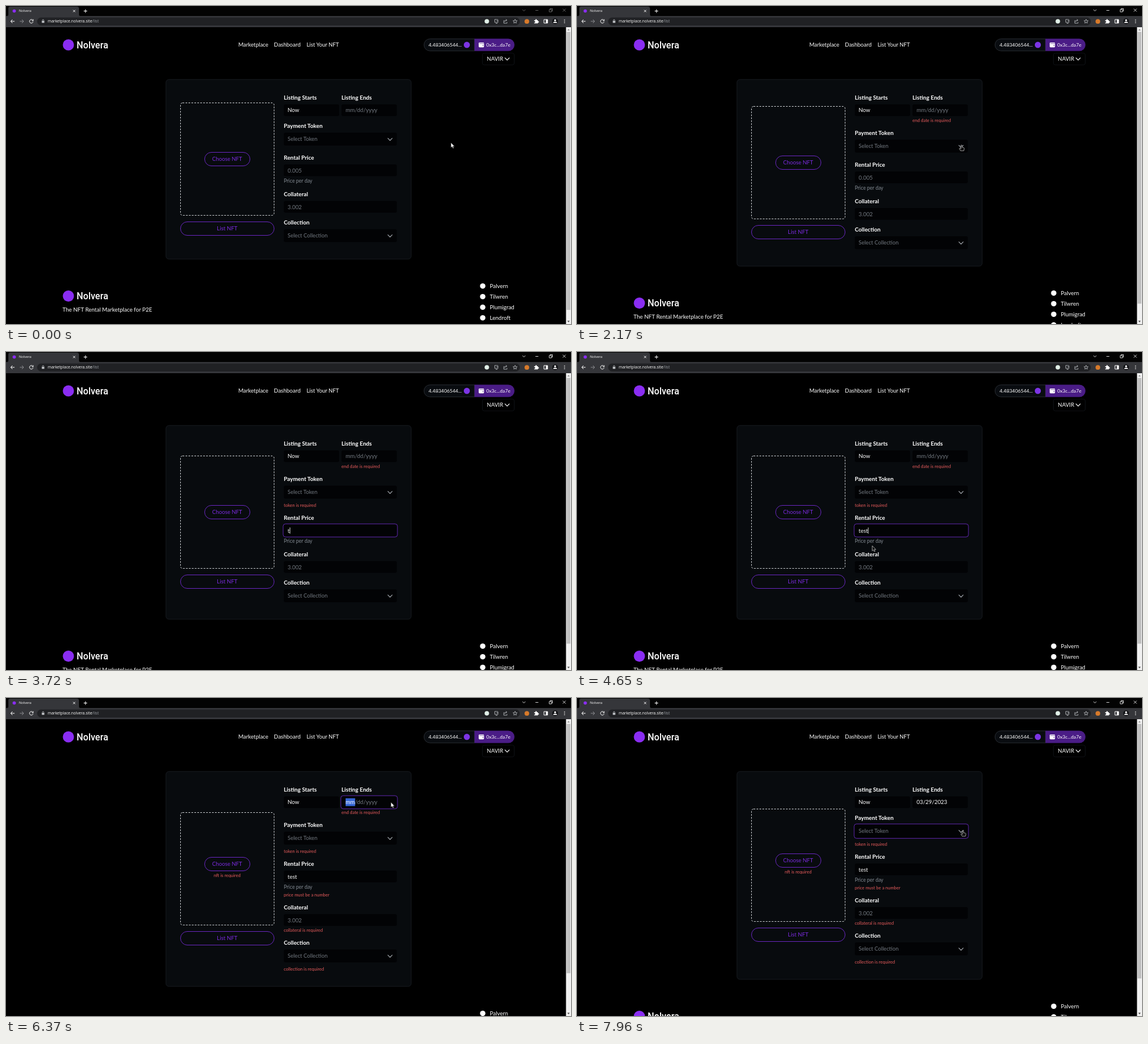
These frames come from a looping animation (960 px wide and 540 px high, 7990 ms). An HTML page:

```html
<!DOCTYPE html>
<html lang="en">
<head>
<meta charset="utf-8">
<title>List an NFT</title>
<style>
html, body { margin: 0; width: 100%; height: 100%; overflow: hidden; background: #000; }
svg { display: block; width: 100%; height: 100%; }
text { font-family: Lato, "Open Sans", sans-serif; fill: #fff; white-space: pre; }
.ui { font-family: "Open Sans", sans-serif; }
.cal { font-family: "Liberation Sans", Arial, sans-serif; }
.brand { font-family: Roboto, sans-serif; font-weight: 500; }
.bold { font-weight: 700; }
.mid { text-anchor: middle; }
.ph { fill: #737980; }
.help { fill: #858c94; }
.err { fill: #e85c5c; }
.vio { fill: #7c2be0; }
.line { fill: none; stroke: #fff; stroke-width: 1; }
.thin { fill: none; stroke: #c4c7cb; stroke-width: .8; }
.chev { fill: none; stroke: #a4a9b0; stroke-width: 1.2; stroke-linecap: round; stroke-linejoin: round; }
.field { fill: #020305; }
.ring { fill: #020305; stroke: #5f27ac; stroke-width: 1; }
.pill { fill: none; stroke: #6826bd; stroke-width: 1; }
</style>
</head>
<body>
<svg id="stage" viewBox="0 0 960 540"></svg>
<script>
const LOOP = 7990;
const PURPLE = '#8a2df2';
const stage = document.getElementById('stage');

const text = (x, y, s, size, cls = '', extra = '') =>
  `<text x="${x}" y="${y + size * 0.36}" font-size="${size}" class="${cls}" ${extra}>${s}</text>`;
const rect = (x, y, w, h, r, attrs) =>
  `<rect x="${x}" y="${y}" width="${w}" height="${h}" rx="${r}" ${attrs}/>`;
const dot = (x, y, r, fill) => `<circle cx="${x}" cy="${y}" r="${r}" fill="${fill}"/>`;
const path = (d, attrs = 'class="line"') => `<path d="${d}" ${attrs}/>`;
const group = (id, body) => `<g id="${id}">${body}</g>`;
const field = (x, y, w, h = 20) => rect(x, y, w, h, 3, 'class="field"');
const ring = (id, x, y, w, h) => rect(x, y, w, h, 4, `id="${id}" class="ring"`);
const label = (x, y, s) => text(x, y, s, 9.7, 'bold');
const error = (id, x, y, s, cls = '') => text(x, y, s, 7.5, 'err ' + cls, `id="${id}"`);
const down = (x, y) => `M${x - 3.6} ${y - 1.8}l3.6 3.6 3.6-3.6`;
const brand = y => dot(106, y, 9.5, PURPLE) + text(120, y + 0.3, 'Nolvera', 15.6, 'brand');

function calendar() {
  let s = rect(570, 187, 109, 140.5, 0, 'fill="#fff" stroke="#8d8d8d" stroke-width=".5"');
  s += text(575.5, 198.2, 'March 2023', 6, 'cal bold', 'style="fill:#111"');
  s += path('M610 197.2h4l-2 2.4z', 'fill="#111"');
  s += path('M650 202.5v-7.5m-3.6 3.4l3.6-3.6 3.6 3.6', 'fill="none" stroke="#c4c4c4" stroke-width=".8"');
  s += path('M666.5 194.5v8m-3.6-3.6l3.6 3.6 3.6-3.6', 'fill="none" stroke="#222" stroke-width=".9"');
  'Su Mo Tu We Th Fr Sa'.split(' ').forEach((d, i) => {
    s += text(582.7 + 14 * i, 217, d, 6.4, 'cal mid', 'style="fill:#222"');
  });
  s += rect(589.7, 252.4, 13.4, 13.4, 0, 'fill="none" stroke="#a0a0a0" stroke-width=".8"');
  s += rect(604, 252.6, 13, 13, 1, 'fill="#4056e8" stroke="#15162a" stroke-width="1.2"');
  s += rect(618, 280.5, 13, 13, 1, 'id="pick" fill="#dfe3ec"');
  for (let i = 0; i < 42; i++) {
    const n = i - 2;
    const day = n < 1 ? n + 28 : n > 31 ? n - 31 : n;
    const fill = n === 14 ? '#fff' : n < 14 ? '#bcbcbc' : n > 31 ? '#7c7c7c' : '#1a1a1a';
    s += text(582.7 + 14 * (i % 7), 231 + 14 * Math.floor(i / 7), day, 6.3,
      'cal mid' + (n === 14 ? ' bold' : ''), `style="fill:${fill}"`);
  }
  s += text(581, 317, 'Clear', 6.2, 'cal', 'style="fill:#2468d8"');
  s += text(652, 317, 'Today', 6.2, 'cal', 'style="fill:#bcbcbc"');
  return s;
}

function chrome() {
  return rect(0, 0, 960, 36, 0, 'fill="#030303"')
    + path('M2 17q2 0 2-3V4q0-3 3-3h113q4 0 4 3v10q0 3 2 3z', 'fill="#35363a"')
    + rect(0, 17, 960, 19, 0, 'fill="#35363a"')
    + rect(53, 19.5, 820, 13.4, 6.7, 'fill="#202124"')
    + dot(14, 8.5, 2.8, PURPLE)
    + text(22, 8.4, 'Nolvera', 5.8, 'ui')
    + path('M114 6.7l3.6 3.6m0-3.6l-3.6 3.6M135 5.6v6m-3-3h6')
    + group('controls', path('M877.5 6l2.5 2.5 2.5-2.5M899.5 7.5h5M923 6h4v4h-4zM924.5 5.8v-1.3h4v4h-1.3M946 4.6l5 5m0-5l-5 5', 'class="line" style="stroke-width:.8"'))
    + path('M14.5 26H8m3-3l-3 3 3 3')
    + path('M23.5 26H30m-3-3l3 3-3 3', 'class="line" style="stroke:#8b8c90"')
    + path('M45.6 24.2a3.1 3.1 0 1 0 .5 2.4M46.2 22.6v2.4h-2.4')
    + rect(60.8, 25.2, 4.4, 3.4, 0.5, 'fill="#c4c7cb"')
    + path('M61.7 25.4v-1a1.3 1.3 0 0 1 2.6 0v1', 'class="thin"')
    + text(71, 26, 'marketplace.nolvera.site<tspan fill="#9aa0a6">/list</tspan>', 6.6, 'ui')
    + dot(817, 26, 3.8, '#e1f0e8')
    + path('M834 22.8h-3.6v5h5.6v-2M832 29.5h3M835.2 22v3.6m-1.6-1.4l1.6 1.6 1.6-1.6M847 24.8h-1.2v4.4h5.4v-2M847.2 26.8q.3-2.8 3.6-2.8m-1.4-1.6l1.7 1.6-1.7 1.6', 'class="thin"')
    + path('M865 22.6l1 2.3 2.5.2-1.9 1.6.6 2.4-2.2-1.3-2.2 1.3.6-2.4-1.9-1.6 2.5-.2z', 'class="thin"')
    + dot(885, 26.2, 3.9, '#d87a2a')
    + path('M897.6 24h2a1.2 1.2 0 1 1 2.2 0h2v2a1.2 1.2 0 1 1 0 2.1v1.4h-6.2v-1.6a1.1 1.1 0 1 0 0-2z', 'fill="#fff"')
    + path('M914 23h6.2v6h-6.2z') + rect(917.4, 23, 2.8, 6, 0, 'fill="#fff"')
    + dot(933, 26, 4.8, '#101114') + dot(933, 24.2, 1.6, '#fff')
    + path('M929.8 28.8q0-2.2 3.2-2.2t3.2 2.2z', 'fill="#fff"')
    + [23.6, 26, 28.4].map(y => dot(949, y, 0.75, '#fff')).join('');
}

function header() {
  return brand(66)
    + text(394.8, 66, 'Marketplace', 9.4)
    + text(455.3, 66, 'Dashboard', 9.5)
    + text(510.8, 66, 'List Your NFT', 9.3)
    + path('M796 55.8h-75.6a10.2 10.2 0 0 0 0 20.4H796z', 'fill="#090c10" stroke="#30353c" stroke-width=".8"')
    + path('M796 55.5h57.5a10.5 10.5 0 0 1 0 21H796z', 'fill="#4a1c86"')
    + text(718, 66.2, '4.483406544...', 8.35)
    + dot(783, 66, 5.2, '#7c34e4')
    + rect(803.2, 62, 9, 8.2, 1.4, 'fill="#fff"')
    + path('M804.4 63.8h7.8', 'stroke="#4a1c86" stroke-width=".7"') + dot(810.4, 67, 0.8, '#4a1c86')
    + text(816, 66.2, '0x3c...da7e', 8.2)
    + rect(809.5, 80, 54, 20, 3, 'fill="#000" stroke="#0e1115"')
    + text(817, 89.8, 'NAVIR', 9.4)
    + path(down(851.5, 90), 'class="chev" style="stroke:#fff"');
}

function form() {
  return rect(271.8, 124.8, 416.6, 305, 5, 'id="panel" fill="#080b0e" stroke="#171b20"')
    + group('left',
        rect(296.5, 164.5, 159, 191, 3.5, 'fill="none" stroke="#c6c9cc" stroke-dasharray="3 2"')
      + group('choose', rect(337.5, 248.5, 77, 23, 11.5, 'class="pill"')
        + text(375.8, 260, 'Choose NFT', 9.3, 'vio mid'))
      + error('nftErr', 375.8, 271, 'nft is required', 'mid')
      + rect(296.5, 366.5, 159, 23, 11.5, 'id="submit" class="pill"')
      + text(375.8, 378, 'List NFT', 9.4, 'vio mid'))
    + label(472, 156, 'Listing Starts') + field(472, 167, 94) + text(478.6, 177, 'Now', 9.4)
    + label(570, 156, 'Listing Ends') + field(570, 167, 94) + ring('dateRing', 568.9, 165.9, 96.2, 22.2)
    + rect(577, 170.3, 16.2, 13.2, 0, 'id="mark" fill="#3566d6"')
    + text(577, 177, '<tspan id="mm">mm</tspan>/dd/yyyy', 9.5, 'ph', 'id="empty"')
    + text(577, 177, '03/29/2023', 9.4, '', 'id="dated"')
    + error('endErr', 570, 194, 'end date is required')
    + group('coll', label(472, 320, 'Collateral') + field(472, 331, 192)
      + text(478.6, 341.2, '3.002', 9.4, 'ph') + error('collErr', 472, 358, 'collateral is required'))
    + group('set', label(472, 368, 'Collection') + field(472, 379, 192, 22)
      + text(478.6, 390, 'Select Collection', 9.2, 'ph') + path(down(652.5, 390.5), 'class="chev"')
      + error('setErr', 472, 412, 'collection is required'))
    + group('price', label(472, 258, 'Rental Price') + field(472, 269, 192)
      + ring('priceRing', 470.9, 267.9, 194.2, 22.2)
      + text(478.6, 279.2, '0.005', 9.4, 'ph', 'id="hint"') + text(478.6, 279.2, '', 9.4, '', 'id="typed"')
      + rect(479, 274, 0.8, 10.5, 0, 'id="caret" fill="#fff"')
      + text(472, 297, 'Price per day', 8.5, 'help') + error('priceErr', 472, 310, 'price must be a number'))
    + group('pay', label(472, 204, 'Payment Token') + field(472, 215, 192, 22)
      + ring('payRing', 470.9, 213.9, 194.2, 24.4)
      + text(478.6, 226, 'Select Token', 9.2, 'ph')
      + path(down(652.5, 226.5), 'class="chev" id="payDown"')
      + path('M648.9 227.6l3.6-3.6 3.6 3.6', 'class="chev" id="payUp"')
      + error('tokenErr', 472, 248, 'token is required')
      + group('menu', rect(472, 241, 192, 40, 2, 'fill="#030406"') + rect(472, 241, 192, 20, 1, 'fill="#942cff"')
        + text(484, 251.2, 'Navir (NAVIR)', 8.3) + text(484, 271, 'Nolvera Test ERC20 (NOLV)', 8.3)));
}

function footer() {
  const links = ['Palvern', 'Tilwren', 'Plumigrad', 'Lendroft'];
  return brand(492.5) + text(96, 515.5, 'The NFT Rental Marketplace for P2E', 9.5)
    + links.map((s, i) => dot(810, 475.5 + 18 * i, 4.6, '#fff') + text(822, 475.5 + 18 * i, s, 9.5)).join('');
}

stage.innerHTML = rect(0, 0, 960, 540, 0, 'fill="#000"')
  + header() + form() + group('foot', footer()) + group('cal', calendar())
  + rect(951.5, 36, 8.5, 504, 0, 'fill="#f1f1f1"')
  + rect(952.5, 44, 6.5, 472, 0, 'id="thumb" fill="#c1c1c1"')
  + path('M953.7 41.6h4.2l-2.1-2.6z', 'fill="#8f8f8f"') + path('M953.7 534.6h4.2l-2.1 2.6z', 'fill="#505050"')
  + chrome()
  + path('M0 0V8.6L2 6.8L3.4 9.8L4.8 9.2L3.5 6.3H6.1Z', 'id="arrow" stroke-width=".7"')
  + path('M-.9 .6Q0-.7 .9 .6V3.8L4 4.5Q5 5 4.8 6.5L4 9.8H-1.5L-3.6 6.3Q-3.5 5-2.2 5.6L-.9 6.6Z', 'id="hand" stroke-width=".7"')
  + path('M-1.6-4.5h3.2M0-4.5v9M-1.6 4.5h3.2', 'id="beam" stroke-width=".8"');

const el = {};
stage.querySelectorAll('[id]').forEach(n => el[n.id] = n);
const show = (id, on) => el[id].setAttribute('visibility', on ? 'visible' : 'hidden');
const move = (id, x, y) => el[id].setAttribute('transform', `translate(${x} ${y})`);

// pointer stops: time, x, y
const stops = [
  [0, 756, 232], [160, 756, 232], [660, 654, 177], [860, 654, 177], [1480, 726.5, 237],
  [1620, 736, 239], [1780, 736, 239], [2200, 652, 236], [2380, 652, 236], [2800, 755, 286.5],
  [2960, 755, 287], [3310, 548, 303], [4440, 548, 303], [5060, 375.5, 400], [5250, 375.5, 400],
  [5980, 654, 177], [6460, 654, 177], [6960, 624, 285], [7130, 624, 285], [7690, 655, 224], [LOOP, 656, 225]
];
function pointer(t) {
  const i = stops.findIndex(s => s[0] > t);
  const [t0, x0, y0] = stops[i - 1], [t1, x1, y1] = stops[i];
  const k = (t - t0) / (t1 - t0), e = k * k * (3 - 2 * k);
  return [x0 + (x1 - x0) * e, y0 + (y1 - y0) * e, x0 !== x1];
}

function draw(t) {
  const within = (a, b) => t >= a && t < b;
  const picked = t >= 7080;
  const on = {
    endErr: within(1700, 7080), tokenErr: t >= 2290, priceErr: t >= 5130,
    collErr: t >= 5130, setErr: t >= 5130, nftErr: t >= 5130
  };
  for (const id in on) show(id, on[id]);

  // each visible message pushes the rows below it by 12px
  const d1 = on.endErr * 12, d2 = d1 + on.tokenErr * 12, d3 = d2 + on.priceErr * 12;
  const d4 = d3 + on.collErr * 12, grow = d4 + on.setErr * 12;
  move('pay', 0, d1);
  move('price', 0, d2);
  move('coll', 0, d3);
  move('set', 0, d4);
  move('foot', 0, grow);
  move('left', 0, grow / 2);
  move('choose', 0, on.nftErr ? -8 : 0);
  el.panel.setAttribute('height', 305 + grow);
  el.thumb.setAttribute('height', 488 * 504 / (521 + grow));

  const dateOn = within(720, 1700) || within(6340, 7080);
  show('dateRing', dateOn);
  show('mark', dateOn);
  el.mm.style.fill = dateOn ? '#fff' : '';
  show('empty', !picked);
  show('dated', picked);
  show('cal', within(760, 1700) || within(6430, 7080));
  show('pick', within(6900, 7080));
  const menu = within(2290, 2900);
  show('menu', menu);
  show('payUp', menu);
  show('payDown', !menu);
  show('payRing', within(2240, 2290) || t >= 7930);

  const priceOn = within(3440, 5130);
  const typed = 'test'.slice(0, t < 3720 ? 0 : 1 + Math.floor((t - 3720) / 130));
  el.typed.textContent = typed;
  show('hint', !typed);
  show('priceRing', priceOn);
  show('caret', priceOn);
  el.caret.setAttribute('x', 478.8 + (typed ? el.typed.getComputedTextLength() : 0));

  const [x, y, moving] = pointer(t);
  const visible = !within(3720, 4440);
  const overSubmit = x > 296 && x < 456 && y > 366 + grow / 2 && y < 390 + grow / 2;
  const overPay = !dateOn && x > 472 && x < 664 && y > 214 + d1 && y < 237 + d1;
  const overPrice = x > 472 && x < 664 && y > 268 + d2 && y < 290 + d2;
  const kind = !visible ? '' : overPrice && !dateOn ? 'beam' : overSubmit || overPay ? 'hand' : 'arrow';
  for (const id of ['arrow', 'hand', 'beam']) {
    show(id, id === kind);
    move(id, x, y);
    el[id].setAttribute('fill', moving ? '#0a0a0a' : '#fff');
    el[id].setAttribute('stroke', moving || id === 'beam' ? '#d8d8d8' : '#222');
  }
  el.submit.style.fill = overSubmit ? '#160e27' : '';
  el.submit.style.stroke = overSubmit ? PURPLE : '';
  el.controls.setAttribute('opacity', t < 720 ? 0.45 : 1);
}

const start = performance.now();
function frame() {
  draw((performance.now() - start) % LOOP);
  requestAnimationFrame(frame);
}
frame();
</script>
</body>
</html>
```
